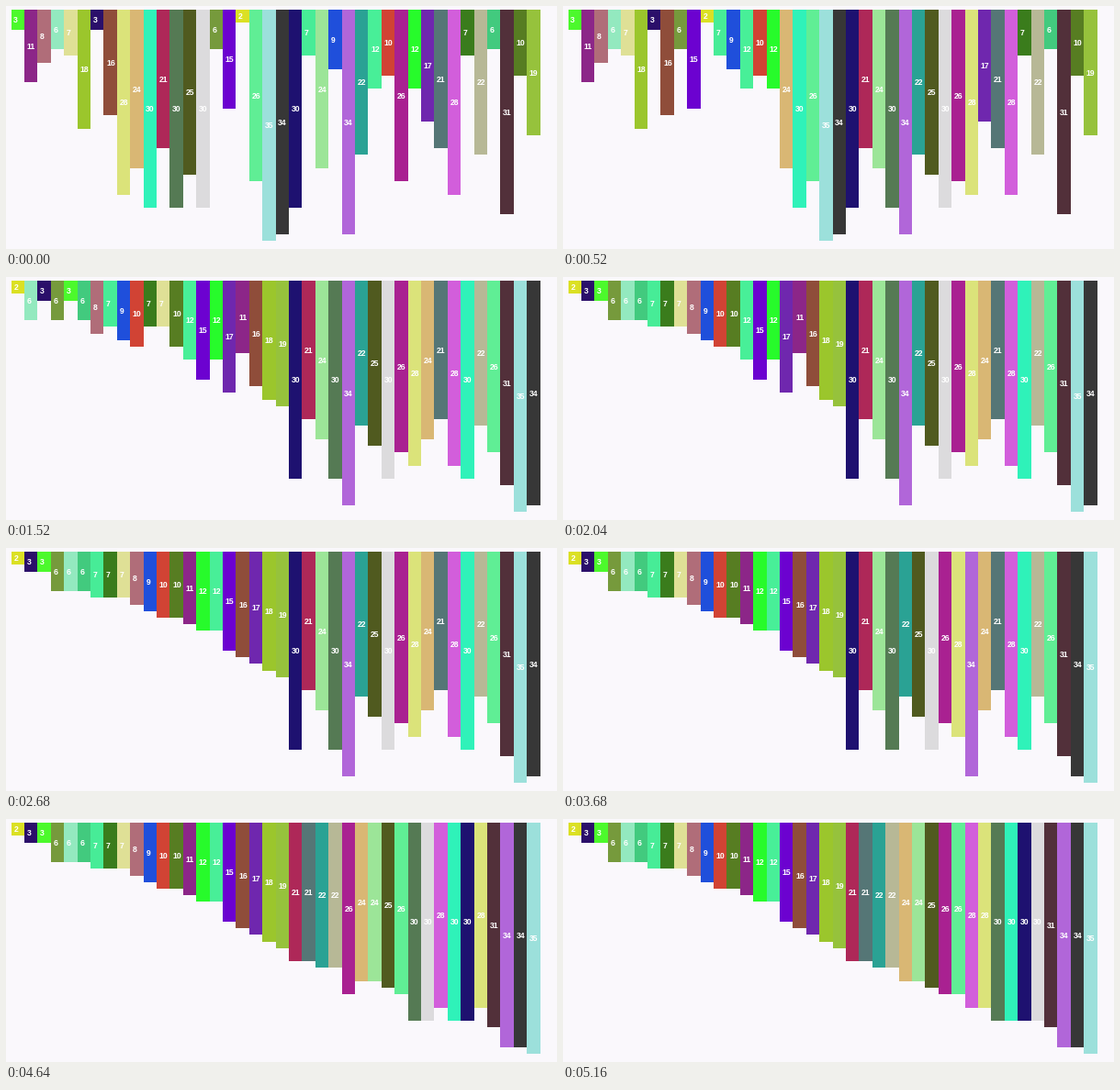
Animation of 600x265 px, one loop 5200 ms. Source, as a matplotlib script:

```python
import matplotlib.pyplot as plt
import numpy as np
from matplotlib.animation import FuncAnimation
from matplotlib.patches import Rectangle

W, H, DPI = 600, 265, 100
FRAMES, INTERVAL = 130, 40
LEFT, TOP, BAR_W, UNIT = 5.6, 4, 14.4, 7.2
FONT_PX = 8.6

# (value, colour) in unsorted order
BARS = [
    (3, "#4cf92c"), (11, "#8c2688"), (8, "#b06d79"), (6, "#93e9bf"),
    (7, "#dfe096"), (18, "#9bc62c"), (3, "#2b0f6a"), (16, "#8f4d3a"),
    (28, "#dbe37a"), (24, "#d9b774"), (30, "#2ff2b9"), (21, "#ae2858"),
    (30, "#557a54"), (25, "#505a1f"), (30, "#dcdbdd"), (6, "#769a3c"),
    (15, "#6c02d0"), (2, "#dbe024"), (26, "#60ee95"), (35, "#9ce0db"),
    (34, "#373737"), (30, "#1e1170"), (7, "#47ec97"), (24, "#9ce598"),
    (9, "#1f4fdb"), (34, "#b166d9"), (22, "#2aa294"), (12, "#48ef98"),
    (10, "#d14334"), (26, "#a92191"), (12, "#27fb2b"), (17, "#6f27ae"),
    (21, "#557676"), (28, "#d25edb"), (7, "#3a7c1c"), (22, "#b7b896"),
    (6, "#42ca7e"), (31, "#52303a"), (10, "#577d22"), (19, "#96c23c"),
]


def quicksort(a, lo, hi):
    """Lomuto quicksort that yields the order after every swap."""
    if lo >= hi:
        return
    pivot, i = a[hi][0], lo
    for j in range(lo, hi):
        if a[j][0] <= pivot:
            a[i], a[j] = a[j], a[i]
            i += 1
            yield list(a)
    a[i], a[hi] = a[hi], a[i]
    yield list(a)
    yield from quicksort(a, lo, i - 1)
    yield from quicksort(a, i + 1, hi)


states = [list(BARS)] + list(quicksort(list(BARS), 0, len(BARS) - 1))


def swaps_done(frame):
    # the sort ticks slightly slower than the frame clock
    n = np.interp(frame, [0, 27, 92, 107, 129], [3, 30, 94, 107, 129])
    return min(int(round(n)), len(states) - 1)


fig = plt.figure(figsize=(W / DPI, H / DPI), dpi=DPI, facecolor="#faf8fc")
ax = fig.add_axes([0, 0, 1, 1])
ax.set_xlim(0, W)
ax.set_ylim(H, 0)
ax.axis("off")

rects, labels = [], []
for k in range(len(BARS)):
    x = LEFT + k * BAR_W
    rects.append(ax.add_patch(Rectangle((x, TOP), BAR_W, 0, lw=0)))
    labels.append(ax.text(x + 2.7, TOP, "", color="white", weight="bold",
                          family="Liberation Sans",
                          size=FONT_PX * 72 / DPI, va="baseline"))


def draw(frame):
    for rect, label, (value, color) in zip(rects, labels,
                                           states[swaps_done(frame)]):
        height = value * UNIT
        rect.set_height(height)
        rect.set_facecolor(color)
        label.set_text(str(value))
        label.set_y(TOP + height / 2 + 3.1)
    return rects + labels


anim = FuncAnimation(fig, draw, frames=FRAMES, interval=INTERVAL,
                     repeat=True, repeat_delay=0, blit=False)
plt.show()
```
